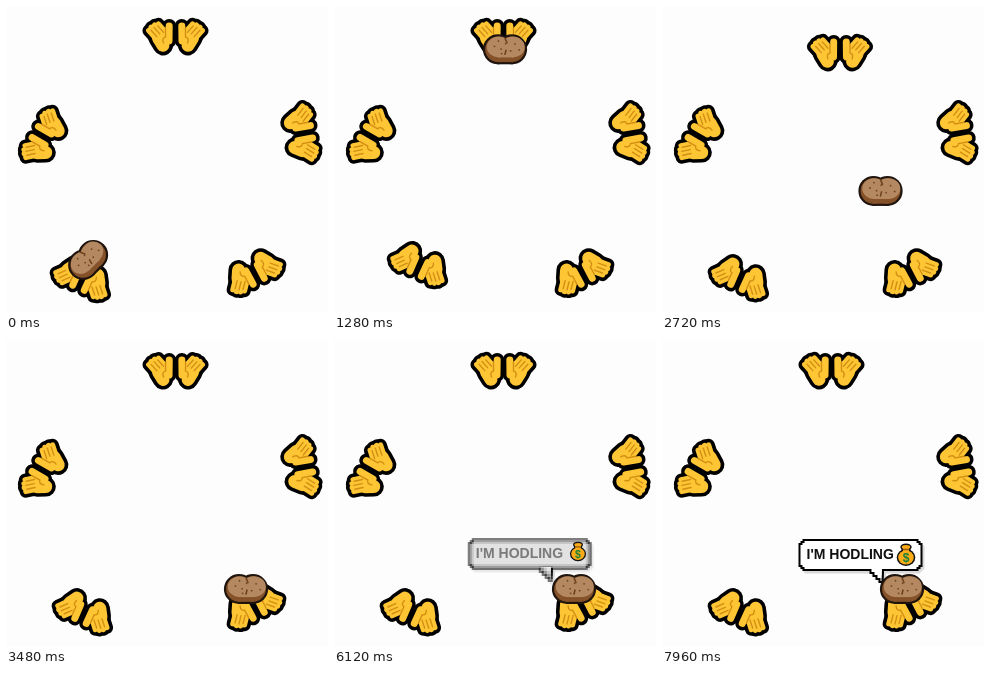
Animation of 322 by 306 pixels, one loop 8000 ms. Source, as an HTML page with a canvas:

```html
<!DOCTYPE html>
<html lang="en">
<head>
<meta charset="utf-8">
<title>Potato toss</title>
<style>
html, body { margin: 0; width: 100%; height: 100%; overflow: hidden; background: #fdfdfd; }
canvas { display: block; }
</style>
</head>
<body>
<canvas id="stage" width="322" height="306"></canvas>
<script>
const ctx = document.getElementById('stage').getContext('2d');
const LOOP = 8000;
const RAD = Math.PI / 180;
const FONT = '"Liberation Sans", Arial, sans-serif';
const clamp = v => Math.max(0, Math.min(1, v));
const mix = (a, b, p) => a + (b - a) * p;
const part = (t, from, to) => clamp((t - from) / (to - from));
const ease = (t, from, to) => 0.5 - 0.5 * Math.cos(Math.PI * part(t, from, to));

function at(x, y, deg, draw) {
  ctx.save();
  ctx.translate(x, y);
  ctx.rotate(deg * RAD);
  draw();
  ctx.restore();
}

function line(x1, y1, x2, y2) {
  ctx.beginPath();
  ctx.moveTo(x1, y1);
  ctx.lineTo(x2, y2);
  ctx.stroke();
}

function oval(x, y, rx, ry) {
  ctx.beginPath();
  ctx.ellipse(x, y, rx, ry, 0, 0, Math.PI * 2);
  ctx.fill();
}

// Hand: parallel fingers whose tips lie on an arc
const LEAN = 42 * RAD;
function finger(i, inset, length) {
  const a = (5 + 19 * i) * RAD;
  const x = 16 + 12.3 * Math.sin(a) - inset * Math.sin(LEAN);
  const y = -0.7 - 12.3 * Math.cos(a) + inset * Math.cos(LEAN);
  line(x, y, x - length * Math.sin(LEAN), y + length * Math.cos(LEAN));
}

function handShape(color, grow) {
  ctx.strokeStyle = color;
  ctx.lineWidth = 13 + grow * 2;
  line(12.5, 8.3, 17, 1);
  ctx.lineWidth = 7 + grow * 2;
  line(6.3, -11, 6.5, 4);
  ctx.lineWidth = 5.2 + grow * 2;
  for (let i = 0; i < 4; i++) finger(i, 0, 15);
}

function hand() {
  handShape('#000', 3.6);
  handShape('#fec534', 0);
  ctx.strokeStyle = '#d38f14';
  ctx.lineWidth = 1.4;
  for (let i = 0.5; i < 3; i++) finger(i, 2, 8.5);
  ctx.beginPath();
  ctx.moveTo(10, -9);
  ctx.lineTo(10, 0);
  ctx.quadraticCurveTo(14, 1, 12, 6);
  ctx.stroke();
}

function hands(x, y, deg) {
  at(x, y, deg, () => {
    ctx.lineCap = 'round';
    hand();
    ctx.scale(-1, 1);
    hand();
  });
}

function lobes(color, x, y, rx, ry) {
  ctx.fillStyle = color;
  oval(x - 7, y, rx, ry);
  oval(x + 7, y, rx, ry);
  ctx.fillRect(x - 8, y, 16, ry);
}

function potato() {
  lobes('#1f140d', 0, 0, 15.1, 15);
  lobes('#855128', 0, 0, 12.9, 12.8);
  lobes('#b48962', 0.8, -2.3, 12, 10.4);
  ctx.fillStyle = ctx.strokeStyle = '#70431f';
  for (let i = 1; i < 9; i++) {
    const r = Math.sqrt(i / 9);
    oval(16 * r * Math.cos(i * 2.4), -2 + 8 * r * Math.sin(i * 2.4), 0.9, 0.9);
  }
  ctx.lineCap = 'round';
  ctx.lineWidth = 1.6;
  line(0, -11, 2, -6.5);
  line(1, 1, 0, 5);
}

// Stepped corners and a staircase tail, built from overlapping bars
function bubbleShape(color, grow) {
  ctx.fillStyle = color;
  const bar = (x, y, w, h) => ctx.fillRect(x - grow, y - grow, w + grow * 2, h + grow * 2);
  for (let k = 0; k < 3; k++) bar(2 * k, 5 - 2 * k, 122 - 4 * k, 22 + 4 * k);
  for (let i = 0; i < 4; i++) bar(71 + 3 * i, 28, 12 - 3 * i, 6 + 3 * i);
}

function bubble() {
  at(2, 2.5, 0, () => bubbleShape('#d9d9d9', 1));
  bubbleShape('#000', 1);
  bubbleShape('#fff', -1);
  ctx.fillStyle = '#111';
  ctx.font = 'bold 14px ' + FONT;
  ctx.fillText("I'M HODLING", 7, 20);
}

function moneyBag() {
  const sack = (color, grow) => {
    ctx.fillStyle = color;
    oval(0, 3, 7.8 + grow, 7 + grow);
    oval(0, -7.5, 4.2 + grow, 2 + grow);
    ctx.fillRect(-3 - grow, -8, 6 + grow * 2, 6);
  };
  sack('#111', 1.5);
  sack('#fbac18', 0);
  ctx.strokeStyle = '#9a5b10';
  ctx.lineWidth = 1.5;
  line(-3, -5, 3, -5);
  ctx.fillStyle = '#15823a';
  ctx.font = 'bold 12px ' + FONT;
  ctx.textAlign = 'center';
  ctx.fillText('$', 0, 7.5);
}

// How far a pair of hands follows its throw before settling back
function reach(t, start, peak, end) {
  return t < peak ? ease(t, start, peak) : 1 - ease(t, peak, end);
}

function drawHands(t) {
  const top = reach(t, 1720, 2740, 3520);
  const left = reach(t, -200, 1050, 1740);
  const windUp = 1 - ease(t, 0, 1050);
  hands(169.5 + 8.5 * top, 31 + 16 * top, 0);
  hands(294.7, 127.7, 80);
  hands(247.5, 265.5, 152);
  hands(79 + 9.5 * left - 2.6 * windUp, 270.8 - 17.5 * left + 2 * windUp, 204);
  hands(38.8, 131.5, -60);
}

// Both tosses take equally long; the first is under way when the loop begins
function drawPotato(t) {
  const first = ease(t, -474, 961);
  const second = ease(t, 1827, 3262);
  const x = mix(mix(53, 171, first), 240, second);
  const y = mix(mix(323, 43.3, first), 249, second);
  at(x, y, -45 * (1 - part(t, 0, 900)), potato);
}

function drawSpeech(t) {
  const p = ease(t, 5520, 6720);
  if (p === 0) return;
  ctx.globalAlpha = p;
  at(mix(132, 137.5, p), mix(197, 199, p), 0, bubble);
  ctx.globalAlpha = clamp(p * 2.1);
  at(244, mix(208, 214.5, p), 0, () => {
    const size = mix(0.74, 1, p);
    ctx.scale(size, size);
    moneyBag();
  });
  ctx.globalAlpha = 1;
}

function render(t) {
  ctx.fillStyle = '#fdfdfd';
  ctx.fillRect(0, 0, 322, 306);
  drawHands(t);
  drawSpeech(t);
  drawPotato(t);
}

const begin = performance.now();
function tick() {
  render((performance.now() - begin) % LOOP);
  requestAnimationFrame(tick);
}
tick();
</script>
</body>
</html>
```
